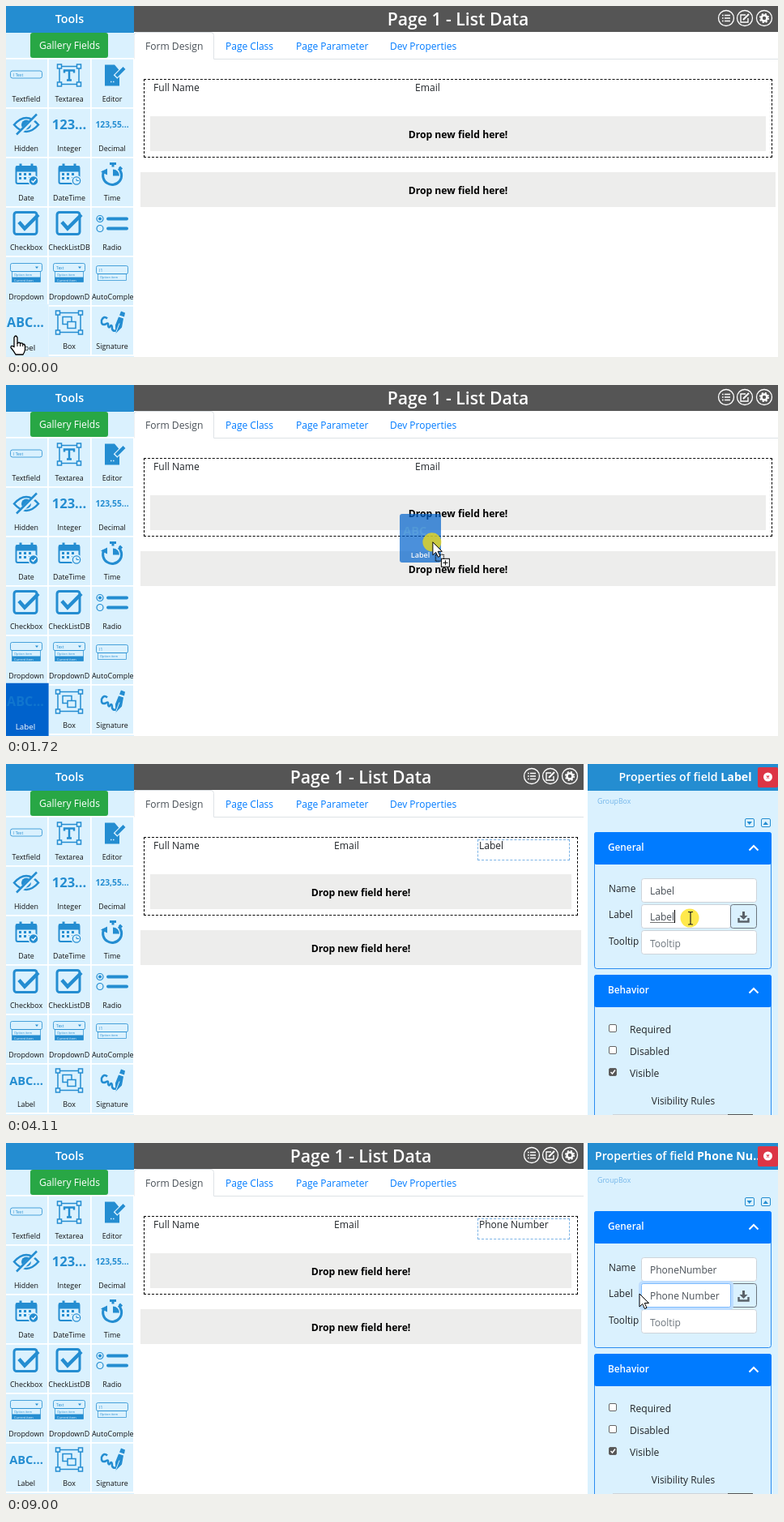
An HTML page for the animation above (9330 ms loop, 953x433 px).

```html
<!DOCTYPE html>
<html lang="en">
<head>
<meta charset="utf-8">
<title>Form designer</title>
<style>
  html, body { margin: 0; width: 100%; height: 100%; overflow: hidden; background: #fff; }
  svg { display: block; font-family: "Open Sans", "Noto Sans", sans-serif; }
  text { white-space: pre; }
  .dashed { box-sizing: border-box; width: 100%; height: 100%; border: 1px dashed; }
</style>
</head>
<body>
<svg id="stage" width="953" height="433" viewBox="0 0 953 433"></svg>
<script>
const LOOP = 9330;
const BLUE = '#248dd1', PALE = '#daf1fe', INK = '#212529', PRIMARY = '#007bff', ACTIVE = '#0062cc';
const PRESS = 700, DRAG = 1000, DROP = 2780, PANEL = 3390, CLICK = 4110, RELEASE = 4640;
const TYPED = 'Phone Number';
const KEY_TIMES = [5500, 6030, 6360, 6560, 6690, 6890, 7420, 7620, 7810, 8080, 8210, 8410];
const FIELD_X = 795;
const GHOST_LAG = 9;
// time, x, y of the pointer
const ROUTE = [
  [0, 12, 407], [60, 12, 407], [800, 34, 408], [DRAG, 34, 408], [1400, 261, 304], [1930, 700, 122],
  [2050, 733, 113], [2500, 747, 107], [3250, 747, 107], [3910, 845, 190], [4150, 845, 190], [RELEASE, 782, 186]
];

const rect = (x, y, w, h, fill, more = '') => `<rect x="${x}" y="${y}" width="${w}" height="${h}" fill="${fill}" ${more}/>`;
const circle = (x, y, r, fill, more = '') => `<circle cx="${x}" cy="${y}" r="${r}" fill="${fill}" ${more}/>`;
const line = (d, width = 1, color = BLUE, more = '') => `<path d="${d}" fill="none" stroke="${color}" stroke-width="${width}" ${more}/>`;
const shape = (d, fill = BLUE, more = '') => `<path d="${d}" fill="${fill}" ${more}/>`;
const text = (x, y, str, size = 12.1, fill = INK, more = '') => `<text x="${x}" y="${y}" font-size="${size}" fill="${fill}" ${more}>${str}</text>`;
const at = (x, y, body, more = '') => `<g transform="translate(${x} ${y})${more}">${body}</g>`;
const dashed = (x, y, w, h, color) => `<foreignObject x="${x}" y="${y}" width="${w}" height="${h}"><div class="dashed" style="border-color:${color}"></div></foreignObject>`;
const MID = 'text-anchor="middle"', SEMI = 'font-weight="600"', BOLD = 'font-weight="700"';
const stroke = (color, width = 1) => `stroke="${color}" stroke-width="${width}"`;

// Tool icons, centred on 0,0
const big = (str, size) => text(0, 5.5, str, size, BLUE, `${MID} ${BOLD}`);
const frame = (w, h) => rect(-w, -h, 2 * w, 2 * h, 'none', stroke(BLUE, 1.5)) +
  [-w, w].map(x => [-h, h].map(y => rect(x - 2.5, y - 2.5, 5, 5, PALE, stroke(BLUE, 1.5))).join('')).join('');
const calendar = badge => rect(-12.5, -9.5, 25, 21, 'none', stroke(BLUE, 2) + ' rx="2"') + rect(-13, -10, 26, 7, BLUE) +
  line('M-7 -13V-7M7 -13V-7', 3) + line('M-9 0H9M-9 5H9', 3, BLUE, 'stroke-dasharray="3"') +
  circle(9, 8, 6, BLUE, stroke(PALE, 1.5)) + badge;
const checkbox = rect(-15, -14, 28, 27, 'none', stroke(BLUE, 3) + ' rx="3"') + line('M-9 -2L-2 6L15 -11', 4.5);
const dropdown = (str, list) => rect(-19.5, -12, 39, 10, 'none', stroke(BLUE, .8) + ' rx="2"') + text(-16, -5, str, 5, BLUE) +
  (list ? shape('M11 -8h4l-2 2.5z') + rect(-17.5, 5, 35, 6, BLUE) + text(-15, 10, 'Current item', 4, '#fff') : '') +
  rect(-17.5, -2, 35, list ? 13 : 8, 'none', stroke(BLUE, .7)) + text(-15, 3.3, 'Option item', 4, BLUE);
const pen = shape('M2 -14L7 -12L6 -7L0 -9ZM-1 -7L5 -5L3 6L-5 14L-5 3Z') + line('M-5 14L0 1', 1, PALE);
const TOOLS = [
  ['Textfield', rect(-19.5, -5.5, 39, 9, 'none', stroke(BLUE, .8) + ' rx="2.5"') + text(-16, 1, 'I Text', 5, BLUE)],
  ['Textarea', frame(12, 11) + line('M-6 -3V-6H6V-3M0 -6V6M-3 6H3', 2.5)],
  ['Editor', shape('M-9 -13H3L9 -6V13H-9Z') + line('M4 2L15 -9', 6.5, PALE) + line('M5 1L15 -9', 4) + line('M-2 8H4', 1.5, PALE, 'stroke-dasharray="1.5"')],
  ['Hidden', line('M-15 0Q0 -17 15 0Q0 17 -15 0Z', 2.5) + circle(0, 0, 6, BLUE) + line('M-11 13L14 -12', 5, PALE) + line('M-12 12L13 -13', 2.5)],
  ['Integer', big('123...', 16.5)],
  ['Decimal', at(0, -2.5, big('123,55...', 10.3))],
  ['Date', calendar(line('M6.5 8L8.5 10L12 6', 1.3, '#fff'))],
  ['DateTime', calendar(circle(9, 8, 4, PALE) + line('M9 5.5V8H12'))],
  ['Time', line('M-10 -4A11.5 11.5 0 1 0 8 -7', 3) + line('M-3 -13H5M1 -13V-9M9 -9L12 -6', 3) + shape('M1 2V-6A8 8 0 0 1 9 2Z') + shape('M-14 -3L-6 -7V1Z')],
  ['Checkbox', checkbox], ['CheckListDB', checkbox],
  ['Radio', circle(-15, -6, 4, 'none', stroke(BLUE, 1.2)) + circle(-15, -6, 2, BLUE) + circle(-15, 6, 4, 'none', stroke(BLUE, 1.2)) + line('M-5 -6H18M-5 6H18', 4, BLUE, 'stroke-linecap="round"')],
  ['Dropdown', dropdown('', true)], ['DropdownD', dropdown('Text', true), true], ['AutoComple', at(0, 3, dropdown('I1', false)), true],
  ['Label', big('ABC...', 14.6)],
  ['Box', frame(14, 12) + rect(-8, -7, 11, 9, 'none', stroke(BLUE, 1.5)) + rect(-2, -1, 10, 8, PALE, stroke(BLUE, 1.5))],
  ['Signature', line('M-6 -5Q-10 -9 -13 -3Q-14 4 -8 2Q-4 -1 -5 4Q-4 8 -2 4Q0 2 0 8Q1 11 5 10', 2.5) + at(9, 0, pen)]
];

function tile([name, icon, fromLeft], blue = 0) {
  return `<svg width="52" height="59.5">` + rect(0, 0, 51.5, 59.5, PALE) + rect(0, 0, 51.5, 59.5, ACTIVE, `opacity="${blue}"`) +
    `<g opacity="${1 - .55 * blue}">${at(25.5, 20, icon)}</g>` +
    text(fromLeft ? .5 : 25.5, 52.5, name, 8.9, blue > .5 ? '#fff' : '#111', fromLeft ? '' : MID) + '</svg>';
}
const labelTool = TOOLS[15];

function sidebar() {
  let out = rect(0, 0, 158, 433, '#fff') + rect(0, 33, 158, 31, PALE) + rect(0, 0, 158, 33, BLUE) +
    text(78.5, 21, 'Tools', 14.3, '#fff', `${MID} ${SEMI}`) +
    rect(30, 33, 96, 31, '#28a745', 'rx="3"') + text(78.5, 53, 'Gallery Fields', 12.1, '#fff', MID);
  TOOLS.forEach((tool, i) => { out += tool === labelTool ? '' : at(i % 3 * 53 - .5, 65.5 + 61 * (i / 3 | 0), tile(tool)); });
  return out + rect(0, 432, 158, 1, PALE);
}

function toolbarIcons(x) {
  const ring = (dx, body) => at(x + dx, 15, circle(0, 0, 9.5, 'none', stroke('#fff', 1.3)) + body);
  const list = line('M-2 -3.5H5M-2 0H5M-2 3.5H5', 1.6, '#fff') + line('M-5 -3.5H-3.3M-5 0H-3.3M-5 3.5H-3.3', 1.6, '#fff');
  const edit = line('M1 -4H-5V5H4V0', 1.4, '#fff') + line('M-2 2L5 -5', 2.2, '#fff');
  const gear = circle(0, 0, 3.5, 'none', stroke('#fff', 2.6)) + circle(0, 0, 5.3, 'none', stroke('#fff', 1.6) + ' stroke-dasharray="2.1"');
  return ring(0, list) + ring(23, edit) + ring(47, gear);
}

// shrink: width taken away from the page by the properties panel
function page(shrink) {
  const mid = 558 - shrink / 2;
  const dropZone = (x, y, w, h) => rect(x, y, w - shrink, h, '#ededec') + text(mid, y + h / 2 + 5, 'Drop new field here!', 12.2, '#000', `${MID} ${BOLD}`);
  return rect(158, 0, 795 - shrink, 32, '#555') +
    text(mid, 24, 'Page 1 - List Data', 21.2, '#fff', `${MID} ${SEMI}`) + toolbarIcons(889 - shrink) +
    line(`M158 65.5V36.5Q158 32.5 162 32.5H253Q256.500 32.5 256.5 36.5V65.5H${953 - shrink}`, 1, '#dee2e6') +
    text(172, 53.5, 'Form Design', 12.1, '#495057') +
    text(271, 53.5, 'Page Class', 12, PRIMARY) + text(358, 53.5, 'Page Parameter', 12, PRIMARY) + text(474, 53.5, 'Dev Properties', 12, PRIMARY) +
    dashed(170, 90, 776 - shrink, 97, '#000') +
    dropZone(178, 136, 760, 43) + dropZone(166, 205, 784, 43);
}

const dropTarget = rect(493, 90, 259, 25, '#d5e9f6') + shape('M505 79V125L493 102Z', '#a6d0e9');

function panel() {
  const card = (y, h, title) => rect(726.5, y + .5, 218, h, PALE, stroke('#2b8cf0') + ' rx="3"') + rect(726, y, 219, 40, PRIMARY, 'rx="3"') +
    text(743, y + 23, title, 11.8, '#fff', SEMI) + line(`M917.500 ${y + 22.5}L923 ${y + 17}L928.500 ${y + 22.5}`, 2, '#fff');
  const input = (y, w = 142) => rect(784.5, y + .5, w, 29, '#fff', stroke('#ced4da') + ' rx="3"');
  const option = (y, name, on) => rect(744.5, y - 10.5, 9, 9, on ? '#555' : '#fff', stroke('#666') + ' rx="1.5"') +
    (on ? line(`M746.500 ${y - 6}L748.500 ${y - 4}L752 ${y - 8.5}`, 1.5, '#fff') : '') + text(770, y, name);
  const toggle = (x, d) => rect(x + .5, 67.5, 11, 10, 'none', stroke(BLUE) + ' rx="1.5"') + shape(d);
  return rect(718, 0, 235, 433, PALE) + rect(718, 0, 235, 33, BLUE) +
    text(0, 21, '', 14.2, '#fff', `id="heading" ${SEMI}`) +
    rect(928, 4, 25, 25, '#dc3545', 'rx="2"') + circle(940.5, 16, 5.5, '#fff') + line('M939 14.500L942 17.500M942 14.500L939 17.500', 1.2, '#dc3545') +
    text(730, 48.5, 'GroupBox', 8.8, '#74b6ea') +
    toggle(912, 'M914.500 71H921L917.700 75Z') + toggle(932, 'M934.500 75H941L937.700 71Z') +
    card(84, 168, 'General') + text(744, 158, 'Name', 11.9) + text(744, 190, 'Label', 11.9) + text(744, 223, 'Tooltip', 11.8) +
    input(141) + input(173, 110) + input(205) +
    rect(894.5, 173.5, 32, 29, PALE, stroke('#6c757d') + ' rx="3"') +
    line('M904.500 190V194.500H916.500V190', 2.4, '#5a6269') + line('M910.500 182V188', 3, '#5a6269') + shape('M905.500 187H915.500L910.500 192Z', '#5a6269') +
    `<g id="focus">${rect(782.5, 171.5, 114, 33, 'none', stroke('#bfdeff', 3) + ' rx="4"')}${rect(784.5, 173.5, 110, 29, '#fff', stroke('#80bdff') + ' rx="2"')}</g>` +
    rect(0, 180, 0, 16, '#0078d7', 'id="selection"') +
    text(FIELD_X, 161, '', 12, '#495057', 'id="nameValue"') + text(FIELD_X, 193, '', 12, '#495057', 'id="labelValue"') +
    line('M795 195.500H825', 1, '#777', 'id="underline"') + rect(0, 180, 1, 16, '#000', 'id="caret"') +
    text(FIELD_X, 226, 'Tooltip', 12, '#6c757d') +
    card(260, 180, 'Behavior') + option(332, 'Required') + option(359, 'Disabled') + option(386, 'Visible', true) +
    text(836, 420, 'Visibility Rules', 11.9, INK, MID) + rect(749, 432, 142, 1, '#ced4da') + rect(891, 432, 31, 1, '#555') +
    dashed(582, 93, 114, 26, '#7db4e6') + text(584, 105, '', 12, INK, 'id="preview"');
}

const ARROW = shape('M0 0V16L3.700 12.500L6.500 18.500L9 17.300L6.300 11.500H11.500Z', '#fff', stroke('#000'));
const CURSORS = {
  hand: shape('M-2 2Q0 -2 2 2V9Q4 7.500 6 9Q8 8.500 9 10Q11 10 11.500 12V17Q11 20 9 23H0Q-2 19 -6 14.500Q-6.500 11 -2 13.500Z', '#fff', stroke('#000', 1.3)) + line('M2 9V13M5.500 9V13M8.700 10V13', 1, '#000'),
  arrow: ARROW,
  beam: line('M-3 -7.500H-1L0 -6.500L1 -7.500H3M0 -6.500V7M-3 8H-1L0 7L1 8H3', 1.2, '#222'),
  blocked: circle(0, 0, 8, 'none', stroke('#e8e08a', 3.6)) + circle(0, 0, 8, 'none', stroke('#4a4a1a', 2)) + line('M-5.500 -5.500L5.500 5.500', 2, '#4a4a1a'),
  copy: rect(3.5, 15.5, 10, 8, 'none', stroke('#000', 1.5) + ' stroke-dasharray="1"') + ARROW +
    rect(10.5, 20.5, 10, 10, '#fff', stroke('#000')) + line('M12.500 25.500H18.500M15.500 22.500V28.500', 1, '#000')
};

const stage = document.getElementById('stage');
stage.innerHTML = rect(0, 0, 953, 433, '#fff') +
  `<g id="wide">${page(0)}<g id="target">${dropTarget}<g id="hot">${shape('M740 79V125L752 102Z', '#083a5c')}</g></g>${text(505, 105, 'Email')}</g>` +
  `<g id="narrow">${page(240)}${text(405, 105, 'Email')}${panel()}</g>` +
  text(182, 105, 'Full Name') + sidebar() + '<g id="moving"></g>';
const part = {};
stage.querySelectorAll('[id]').forEach(el => { part[el.id] = el; });

const show = (el, on) => el.setAttribute('display', on ? 'inline' : 'none');
const clamp = (v, lo, hi) => Math.min(hi, Math.max(lo, v));
const between = (t, from, to) => t >= from && t < to;

function pointer(t) {
  const next = ROUTE.findIndex(p => p[0] > t);
  if (next < 0) return ROUTE[ROUTE.length - 1].slice(1);
  const [t0, x0, y0] = ROUTE[next - 1], [t1, x1, y1] = ROUTE[next];
  const k = (t - t0) / (t1 - t0);
  return [x0 + (x1 - x0) * k, y0 + (y1 - y0) * k];
}

function cursorFor(t, x, y) {
  if (between(t, DRAG, DROP)) return y > 250 ? 'blocked' : 'copy';
  if (t < PANEL) return 'hand';
  return x > 785 && y > 141 ? 'beam' : 'arrow';
}

function drawPanel(t, mouseX) {
  const count = KEY_TIMES.filter(k => k <= t).length;
  const value = count ? TYPED.slice(0, count) : 'Label';
  part.preview.textContent = value;
  part.nameValue.textContent = value.replace(' ', '');

  const long = value.length > 7;
  part.heading.innerHTML = `Properties of field <tspan ${BOLD}>${long ? value.slice(0, 8) + '…' : value.trim()}</tspan>`;
  part.heading.setAttribute('x', long ? 727 : 838.5 - part.heading.getComputedTextLength() / 2);

  const selecting = !count && t > CLICK + 40;
  const first = selecting ? clamp(Math.round((mouseX - FIELD_X) / 6), 0, 5) : value.length;
  part.labelValue.innerHTML = value.slice(0, first) + `<tspan fill="#fff">${value.slice(first)}</tspan>`;
  const full = part.labelValue.getComputedTextLength();
  const start = first ? part.labelValue.getSubStringLength(0, first) : 0;
  part.selection.setAttribute('x', FIELD_X + start);
  part.selection.setAttribute('width', Math.max(0, full - start));
  part.caret.setAttribute('x', Math.round(FIELD_X + full));
  show(part.caret, first === value.length && between(t, CLICK, 9000));
  show(part.underline, between(t, CLICK, CLICK + 200));
  part.focus.setAttribute('opacity', clamp((t - CLICK) / 150, 0, 1));
}

function ghost(t) {
  const [x, y] = pointer(t - GHOST_LAG);
  const body = rect(0, 0, 51, 60, ACTIVE, 'rx="3"') + `<g opacity=".45">${at(25, 20, labelTool[1])}</g>` + text(25.5, 53.5, 'Label', 9, '#fff', `${MID} ${SEMI}`);
  return `<g opacity=".7">${at(Math.round(x - 33), Math.round(y - 38), body)}</g>`;
}

function draw(t) {
  const [x, y] = pointer(t);
  const open = t >= PANEL, dragging = between(t, DRAG, DROP);
  const pressed = between(t, PRESS, DROP) || between(t, CLICK, RELEASE);
  show(part.wide, !open);
  show(part.narrow, open);
  show(part.target, t > 1780 && !open);
  show(part.hot, t > 1990);
  if (open) drawPanel(t, x);

  const blue = open ? 0 : clamp((t - 60) / 200, 0, 1);
  part.moving.innerHTML = at(-.5, 370.5, tile(labelTool, blue), open ? '' : ' translate(24.5 30) scale(1.1) translate(-25.5 -30)') +
    (dragging ? ghost(t) : '') +
    (pressed ? circle(x - 1, y, 11.5, '#ffe000', 'opacity=".7"') : '') +
    at(x, y, CURSORS[cursorFor(t, x, y)]);
}

const begin = performance.now();
function tick() {
  draw((performance.now() - begin) % LOOP);
  requestAnimationFrame(tick);
}
tick();
</script>
</body>
</html>
```
